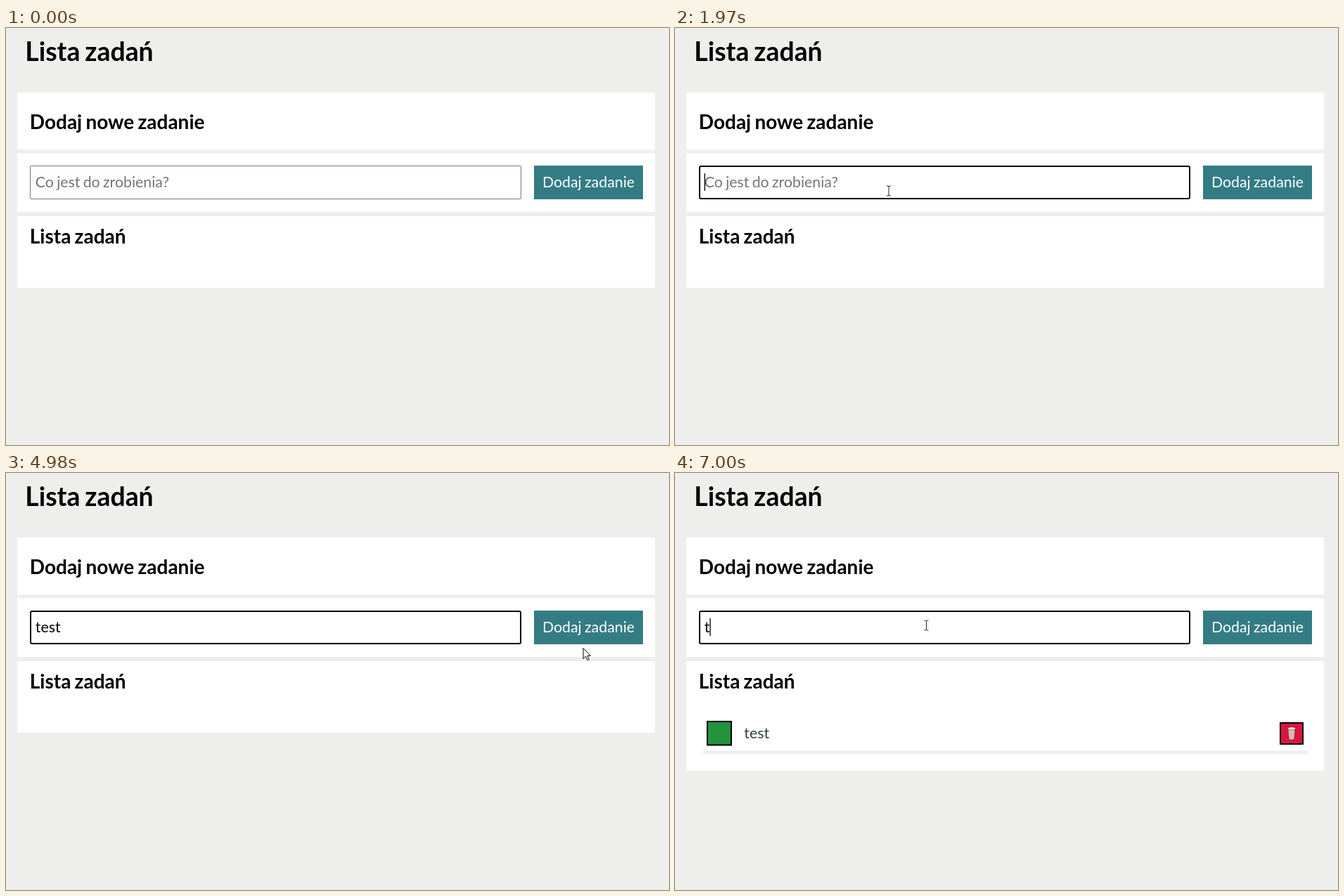
An HTML page for the animation above (8 s loop, 943 px wide and 594 px high).

```html
<!DOCTYPE html>
<html lang="pl">
<head>
<meta charset="utf-8">
<title>Lista zadań</title>
<style>
html, body { margin: 0; width: 100%; height: 100%; overflow: hidden; background: #eeeeed; }
svg { display: block; width: 943px; height: 594px; font: 21.33px Lato, sans-serif; }
text { word-spacing: -.057em; }
.h1, .h2 { font-weight: 700; }
.h1 { font-size: 37.33px; }
.h2 { font-size: 28px; }
</style>
</head>
<body>
<svg viewBox="0 0 943 594">
  <rect width="943" height="594" fill="#eeeeed"/>
  <g fill="#fff">
    <rect x="16" y="92" width="907" height="81.5"/>
    <rect x="16" y="178.5" width="907" height="83.5"/>
    <rect id="panel" x="16" y="268" width="907" height="102"/>
  </g>
  <text class="h1" x="27.3" y="47">Lista zadań</text>
  <text class="h2" x="33.8" y="143.5">Dodaj nowe zadanie</text>
  <text class="h2" x="33.8" y="306.5">Lista zadań</text>

  <rect id="field" fill="#fff"/>
  <text id="entry" x="41.8" y="227"></text>
  <rect id="caret" y="207" width="1.3" height="25"/>
  <rect x="751" y="196" width="155" height="48" fill="#347c84"/>
  <text x="762.9" y="227" fill="#fff">Dodaj zadanie</text>

  <g id="item">
    <rect x="46" y="354" width="34" height="33.5" fill="#21943d" stroke="#000" stroke-width="2"/>
    <text x="98.3" y="378" fill="#2f4234">test</text>
    <rect x="861" y="356" width="32" height="30" fill="#dc143c" stroke="#000" stroke-width="2"/>
    <g fill="#eee3dc" stroke="#6d3038" stroke-width=".7">
      <path d="M872.3 364.5L873.3 379Q877 381 880.7 379L881.7 364.5Z"/>
      <path d="M874.7 366.5L875.2 378M877 367V378.5M879.3 366.5L878.8 378" fill="none" stroke="#9a6a68"/>
      <ellipse cx="877" cy="364" rx="5.7" ry="2.2"/>
    </g>
    <rect x="40" y="395.5" width="860" height="5" fill="#eee"/>
  </g>

  <path id="beam" d="M-3 -7H-1L0 -6L1 -7H3M0 -6V6M-3 7H-1L0 6L1 7H3" fill="none" stroke="#222" stroke-width="1"/>
  <path id="arrow" d="M.5 .5V15.5L4 12.2L6.4 17.5L8.7 16.5L6.3 11.3H11Z" fill="#fff" stroke="#000" stroke-width="1"/>
</svg>
<script>
const LOOP = 8000;
const HINT = "Co jest do zrobienia?";
const steps = [
  { at: 0 },
  { at: 1000, arrow: [300, 248] },
  { at: 1970, focus: true, caret: 41.7, beam: [304, 232] },
  { at: 2970, focus: true, text: "te", caret: 60.8, beam: [304, 232] },
  { at: 3980, focus: true, text: "test", beam: [304, 232] },
  { at: 4980, focus: true, text: "test", arrow: [820.5, 249] },
  { at: 5980, focus: true, caret: 41.7, beam: [380, 228.5], added: true },
  { at: 7000, focus: true, text: "t", caret: 49.4, beam: [357.5, 217], added: true }
];

const $ = id => document.getElementById(id);
const set = (id, attrs) => {
  for (const name in attrs) $(id).setAttribute(name, attrs[name]);
};
const show = (id, on) => set(id, { visibility: on ? "visible" : "hidden" });
const place = (id, pos) => {
  show(id, pos);
  if (pos) set(id, { transform: `translate(${pos})` });
};

function draw(step) {
  const line = step.focus ? 2 : 1;
  set("field", {
    x: 34 + line / 2, y: 196 + line / 2,
    width: 699 - line, height: 48 - line,
    rx: step.focus ? 2 : 1.5,
    stroke: step.focus ? "#000" : "#767676", "stroke-width": line
  });
  $("entry").textContent = step.text || HINT;
  set("entry", { fill: step.text ? "#000" : "#757575" });
  show("caret", step.caret);
  if (step.caret) set("caret", { x: step.caret });
  place("beam", step.beam);
  place("arrow", step.arrow);
  show("item", step.added);
  set("panel", { height: step.added ? 156 : 102 });
}

let current;
const start = performance.now();
function tick(now) {
  const time = Math.max(0, now - start) % LOOP;
  const step = steps.findLast(s => s.at <= time);
  if (step !== current) draw(current = step);
  requestAnimationFrame(tick);
}
tick(start);
</script>
</body>
</html>
```
